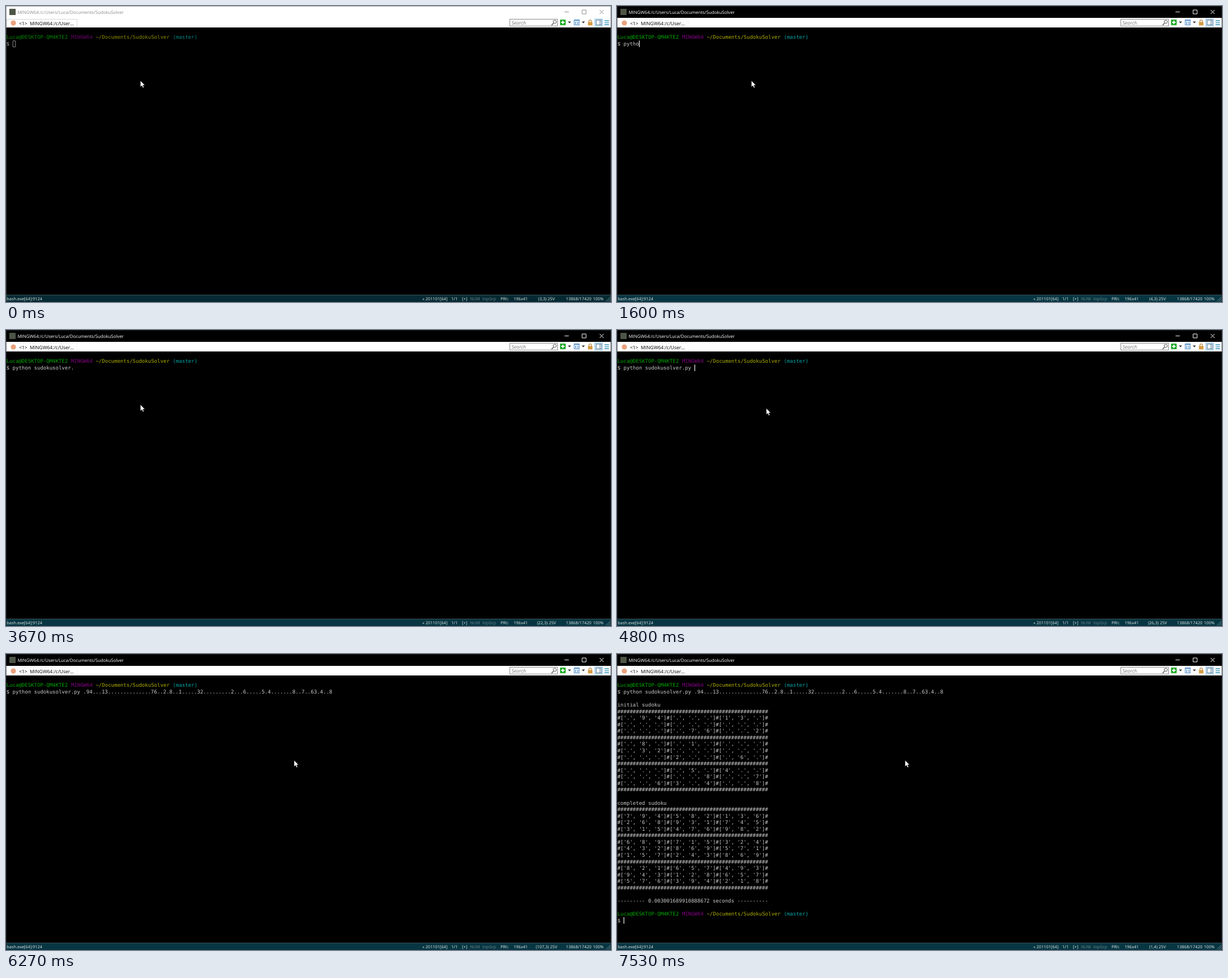
These frames come from a looping animation (1068 px wide and 524 px high, 8 s). An HTML page:

```html
<!DOCTYPE html>
<html lang="en">
<head>
<meta charset="utf-8">
<title>Sudoku solver in a terminal</title>
<style>
  html, body { margin: 0; width: 100%; height: 100%; overflow: hidden; background: #000; }
  svg { display: block; width: 1068px; height: 524px; text-rendering: geometricPrecision; }
  text { font-family: "Open Sans", "Noto Sans", sans-serif; white-space: pre; }
  #term text { font: 9.036px "DejaVu Sans Mono", "Noto Sans Mono", monospace; }
  #status text { font-size: 7.4px; fill: #e4eaea; }
  #status .off { fill: #6d848b; }
</style>
</head>
<body>
<svg viewBox="0 0 1068 524">
  <rect width="1068" height="524"/>

  <g id="title">
    <rect id="titleBar" width="1068" height="21"/>
    <rect x="6" y="5" width="11" height="11" fill="#4d5547"/>
    <text id="titleText" x="20.5" y="13.5" font-size="7.85"></text>
    <path id="buttons" fill="none" d="M986 10.5h7.5M1017 7h7v7h-7zM1048 7l7 7m0-7l-7 7"/>
  </g>

  <g id="tabs">
    <rect y="21" width="1068" height="17" fill="#fff"/>
    <path id="tabEdge" d="M1.5 37.5V23.5H125.5V37.5" fill="none" stroke-width=".7"/>
    <circle cx="13" cy="30" r="4.6" fill="#e9a27c"/>
    <text x="23" y="33.6" font-size="8.5">&lt;1&gt;</text>
    <text x="42" y="33.6" font-size="8.5">MINGW64:/c/User...</text>

    <rect x="889.4" y="23.4" width="84.2" height="12.2" fill="#fff" stroke="#888"/>
    <text x="892.5" y="32.7" font-size="8.6" font-style="italic" fill="#777">Search</text>
    <path d="M966.5 30.5l-3.5 3.5" stroke="#444" stroke-width="1.3"/>
    <circle cx="968.7" cy="28" r="2.8" fill="#fff" stroke="#555"/>

    <rect x="978" y="24" width="10" height="10" rx="1" fill="#22ac2c"/>
    <path d="M983 26v6m-3-3h6" stroke="#fff" stroke-width="1.8"/>
    <path d="M992 27.5h5.4l-2.7 3zM1016.5 27.5h5.4l-2.7 3z" fill="#222"/>
    <rect x="1003" y="24.5" width="9" height="9" fill="#d8e9f8" stroke="#5a8fc4"/>
    <path d="M1003 25.5h9M1005.5 28v4m4-4v4" stroke="#5a8fc4"/>
    <path d="M1029 29v-2.2a2.2 2.2 0 0 1 4.4 0V29" fill="none" stroke="#b58a4a" stroke-width="1.2"/>
    <rect x="1027.3" y="28.3" width="8" height="6" fill="#d59a42"/>
    <rect x="1039.5" y="23" width="13.5" height="13" fill="#cfe6f8" stroke="#8cc0e8"/>
    <rect x="1042" y="25" width="9" height="8.5" fill="#fff" stroke="#59788f"/>
    <path d="M1048.5 25v8.5" stroke="#59788f"/>
    <path d="M1056.5 26.2h8m-8 3.4h8m-8 3.4h8" stroke="#2b93b8" stroke-width="1.4"/>
  </g>

  <g id="term"></g>

  <g id="status">
    <rect id="statusBar" y="512" width="1068" height="12"/>
    <path d="M0 511.6h1068" stroke="#4d676e" stroke-width=".8"/>
    <text x="1.3" y="520.6">bash.exe[64]:9124</text>
    <text x="735" y="520.6">« 201101[64]</text>
    <text x="786" y="520.6">1/1</text>
    <text x="805" y="520.6">[+]</text>
    <text x="819" y="520.6" class="off">NUM</text>
    <text x="841" y="520.6" class="off">InpGrp</text>
    <text x="873" y="520.6">PRI↕</text>
    <text x="896" y="520.6">196x41</text>
    <text id="position" x="954.2" y="520.6" text-anchor="middle"></text>
    <text x="988.5" y="520.6">13868/17420</text>
    <text x="1036" y="520.6">100%</text>
    <path d="M1059 523l8-8m-5 8l5-5m-2 5l2-2" stroke="#8fa3a8" stroke-width=".7"/>
  </g>

  <path id="border" d="M.35 524V.35H1067.65V524" fill="none" stroke-width=".7"/>
  <path id="mouse" d="M0 0V11.4L2.6 9L4.4 13L6.3 12.2L4.6 8.3H8Z" fill="#fff" stroke="#000" stroke-width=".6"/>
</svg>

<script>
const LOOP = 8000, CELL_W = 5.44, CELL_H = 11.56, LEFT = 0.68, TOP = 38.08;
const FOCUS = 70, ENTER = 7340, LAG = 60, BLINK = 533, REFRESH = 600;
const USER = "Luca", HOST = "DESKTOP-QM4KTE2", DIR = "Documents/SudokuSolver";

const puzzle = ".94...13. ......... ....76..2 .8..1.... .32...... ...2...6. ....5.4.. .....8..7 ..63.4..8".split(" ");
const solved = "794582136 268931745 315476982 689715324 432869571 157243869 821657493 943128657 576394218".split(" ");

// Each burst of input: its text, its start and the time between characters.
const bursts = [["python sudo", 1048, 138], ["kusolver", 2800, 0], [".py ", 3670, 200],
  [puzzle.join(""), 5330, 2.45]];
const keys = bursts.flatMap(([text, start, gap]) =>
  [...text].map((char, i) => ({ char, time: start + i * gap })));
const inputs = [FOCUS, ...keys.map(key => key.time), ENTER];

const typed = t => "$ " + keys.filter(key => key.time <= t).map(key => key.char).join("");
const entered = t => t >= ENTER + LAG;

// Every input restarts the blink after a short lag.
function cursorOn(t) {
  const last = inputs.findLast(time => time + LAG <= t) ?? 0;
  return Math.floor((t - LAG - last) / BLINK) % 2 == 0 || t < FOCUS;
}

// The status bar samples the cursor column at a slow, regular rate.
function position(t) {
  const sample = Math.floor((t - 500) / REFRESH) * REFRESH + 500;
  return entered(t) ? "(1,4) 25V" : `(${typed(sample).length + 1},3) 25V`;
}

const progress = (t, from, to) => Math.min(1, Math.max(0, (t - from) / (to - from)));
function mouse(t) {
  const a = progress(t, 4470, 5070) ** 2, b = progress(t, 6030, 6270);
  const ease = b * b * (3 - 2 * b);
  return [237.2 + 86.3 * a + 185 * ease, 132 - .3 * a + 8 * Math.sin(Math.PI * a) + 56.3 * ease];
}

function grid(rows) {
  const bar = "#".repeat(49);
  const lines = rows.map(row =>
    "#" + row.match(/.../g).map(box => `[${[...box].map(c => `'${c}'`).join(", ")}]#`).join(""));
  return [bar, ...lines.flatMap((line, i) => i % 3 == 2 ? [line, bar] : [line])];
}
const output = ["", "initial sudoku", ...grid(puzzle), "", "completed sudoku", ...grid(solved), "",
  "--------- 0.003001689910888672 seconds ----------"];

const run = (row, col, str, fill) =>
  `<text x="${LEFT + col * CELL_W}" y="${TOP + row * CELL_H + 8.8}" fill="${fill}">${str}</text>`;

function prompt(row) {
  const parts = [[`${USER}@${HOST}`, "#00a800"], ["MINGW64", "#860086"], ["~/" + DIR, "#aeae00"],
    ["(master)", "#00a8a8"]];
  let col = 0;
  return parts.map(([str, fill]) => {
    const text = run(row, col, str, fill);
    col += str.length + 1;
    return text;
  }).join("");
}

function cursor(row, col, hollow) {
  const x = LEFT + col * CELL_W, y = TOP + row * CELL_H;
  return hollow
    ? `<rect x="${x + .6}" y="${y + .5}" width="4.6" height="10.7" rx=".5" fill="none" stroke="#c8c8c8" stroke-width=".9"/>`
    : `<rect x="${x}" y="${y}" width="1.36" height="${CELL_H}" fill="#d8d8d8"/>`;
}

function terminal(t) {
  const grey = "#cacaca", line = typed(t), lines = [];
  let caret = entered(t) ? [3, 0] : [2, line.length];
  if (t >= 7470) {
    lines.push(...output);
    caret = [3 + output.length, 0];
  }
  let out = prompt(1) + [line, ...lines].map((str, i) => run(2 + i, 0, str, grey)).join("");
  if (t >= 7530) {
    out += prompt(36) + run(37, 0, "$", grey);
    caret = [37, 2];
  }
  return cursorOn(t) ? out + cursor(...caret, t < FOCUS + LAG) : out;
}

const el = id => document.getElementById(id);
const set = (id, name, value) => el(id).setAttribute(name, value);

function draw(t) {
  const active = t >= FOCUS;
  set("titleBar", "fill", active ? "#000" : "#fff");
  set("titleText", "fill", active ? "#fff" : "#8c8c8c");
  set("buttons", "stroke", active ? "#fff" : "#8c8c8c");
  set("tabEdge", "stroke", active ? "#eee" : "#c4c4c4");
  set("border", "stroke", active ? "#333" : "#666");
  set("statusBar", "fill", active ? "#073642" : "#062a33");
  set("mouse", "transform", `translate(${mouse(t)})`);
  set("term", "opacity", t < FOCUS + LAG ? .8 : 1);
  el("position").textContent = position(t);
  el("term").innerHTML = terminal(t);
}

el("titleText").textContent = `MINGW64:/c/Users/${USER}/${DIR}`;
const begin = performance.now();
function frame() {
  draw((performance.now() - begin) % LOOP);
  requestAnimationFrame(frame);
}
frame();
</script>
</body>
</html>
```
